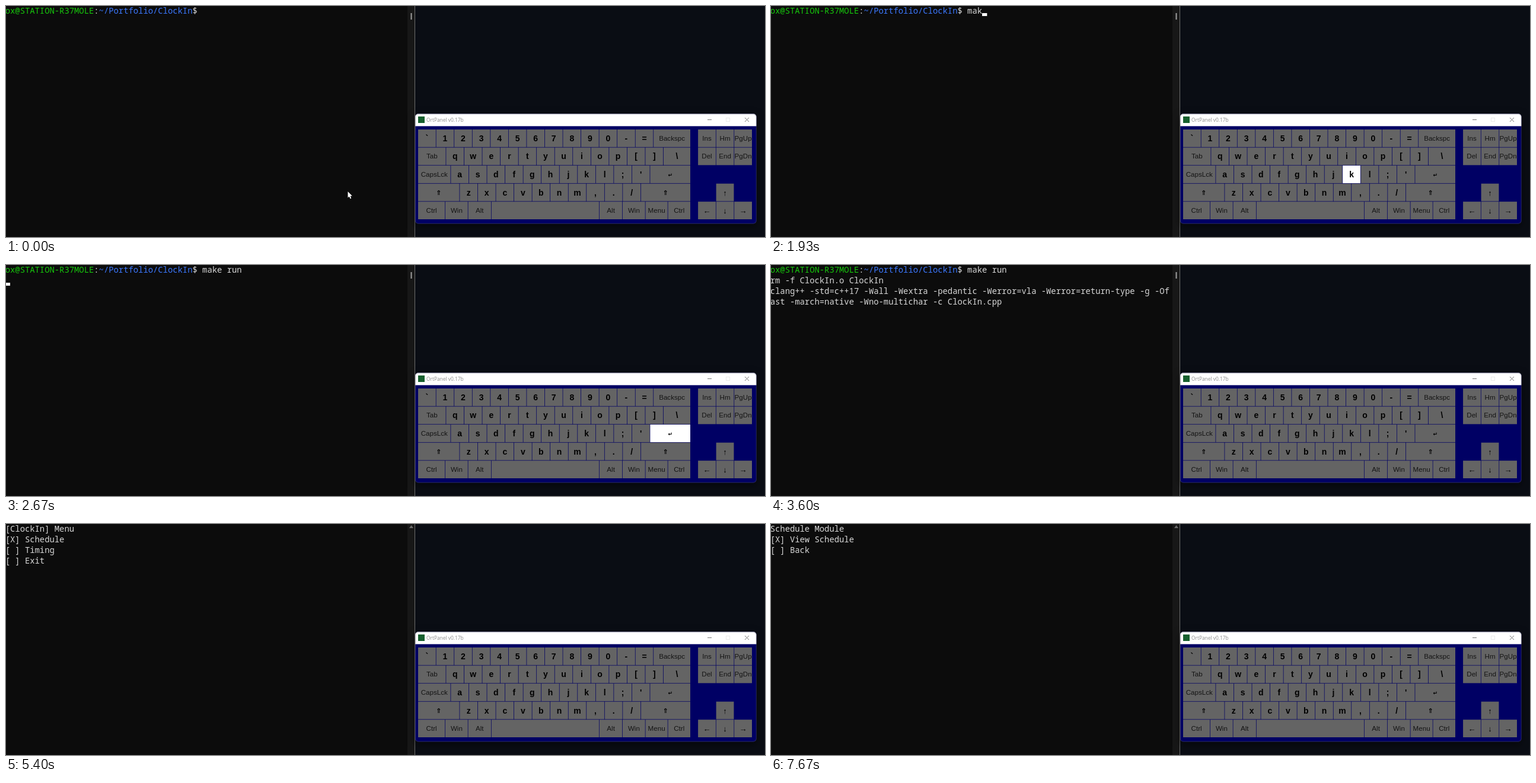
These frames come from a looping animation (1280 by 391 pixels, 8 s). An HTML page with a canvas:

```html
<!DOCTYPE html>
<html lang="en">
<head>
<meta charset="utf-8">
<title>Terminal and keyboard</title>
<style>
  html, body { margin: 0; width: 100%; height: 100%; overflow: hidden; background: #0c0c0c; }
  canvas { display: block; width: 100vw; height: 100vh; }
</style>
</head>
<body>
<canvas id="stage" width="1280" height="391"></canvas>
<script>
const ctx = document.getElementById('stage').getContext('2d');
const LOOP = 8000;

// ---- Terminal ----
const CELL = 8.31, LEFT = -1.3, ROW = 18, BASE = 13;
const GREY = '#d8d8d8';
const PROMPT = [['ox@STATION-R37MOLE', '#16c60c'], [':', GREY], ['~/Portfolio/ClockIn', '#3b78ff'], ['$ ', GREY]];
const FLAGS = ['clang++ -std=c++17 -Wall -Wextra -pedantic -Werror=vla -Werror=return-type -g -Of',
               'ast -march=native -Wno-multichar '];
const COMPILE = ['rm -f ClockIn.o ClockIn', FLAGS[0], FLAGS[1] + '-c ClockIn.cpp'];
const LINK = [FLAGS[0], FLAGS[1] + '-o ClockIn ClockIn.o', './ClockIn'];

const menu = (title, items, chosen) =>
  [title, ...items.map((item, i) => `[${i === chosen ? 'X' : ' '}] ${item}`)];
const mainMenu = chosen => menu('[ClockIn] Menu', ['Schedule', 'Timing', 'Exit'], chosen);

// Each step: start time, command typed, held key
const TYPING = [
  [0, '', ''], [1800, 'm', 'm'], [1870, 'ma', 'a'], [1930, 'mak', 'k'], [2000, 'make', 'e'],
  [2070, 'make ', 'Space'], [2130, 'make ', ''], [2200, 'make r', 'r'], [2270, 'make ru', 'u'],
  [2330, 'make ru', ''], [2470, 'make run', 'n'], [2530, 'make run', '']
];
// Key holds after the command has been typed
const HOLDS = [[2670, 2730, '↵'], [6530, 6670, '↓'], [6870, 7000, '↑'], [7530, 7670, '↵']];

function stateAt(t) {
  const [, typed, key] = TYPING.findLast(step => t >= step[0]);
  const hold = HOLDS.find(([from, to]) => t >= from && t < to);
  const state = { typed, key: hold ? hold[2] : key, lines: [], cursor: null, app: t >= 4400 };

  if (t < 2670) {
    const visible = t >= 1800 || (t >= 930 && t < 1470);
    if (visible) state.cursor = [40 + typed.length, 0];
  } else if (t < 2730) {
    state.cursor = [0, 1];
  } else if (t < 4330) {
    state.lines = COMPILE;
    if (t < 3600 || t >= 4130) state.cursor = [0, 4];
  } else if (t < 4400) {
    state.lines = [...COMPILE, ...LINK];
    state.cursor = [0, 7];
  } else if (t < 5400) {
    state.lines = ['[ClockIn] Loading schedule...'];
  } else if (t < 7600) {
    state.lines = mainMenu(t >= 6530 && t < 6870 ? 1 : 0);
  } else {
    state.lines = menu('Schedule Module', ['View Schedule', 'Back'], 0);
  }
  return state;
}

function rect(x, y, w, h, color) {
  ctx.fillStyle = color;
  ctx.fillRect(x, y, w, h);
}

function write(text, col, row, color = GREY) {
  ctx.fillStyle = color;
  [...text].forEach((ch, i) => ctx.fillText(ch, LEFT + (col + i) * CELL, BASE + row * ROW));
}

function drawTerminal({ typed, lines, cursor, app }) {
  rect(0, 0, 677, 391, '#0c0c0c');
  rect(677, 0, 12, 391, '#171717');
  rect(689, 0, 1, 391, '#6e6e6e');
  ctx.font = '500 13.85px "Noto Sans Mono", monospace';
  ctx.textAlign = 'left';
  if (app) {
    polygon([[680, 7], [683.5, 2], [687, 7]], '#6a6a6a');
  } else {
    rect(682.5, 12, 2, 11, '#9f9f9f');
    let col = 0;
    for (const [text, color] of PROMPT) {
      write(text, col, 0, color);
      col += text.length;
    }
    write(typed, col, 0);
  }
  lines.forEach((line, i) => write(line, 0, app ? i : i + 1));
  if (cursor) rect(LEFT + cursor[0] * CELL, 12 + cursor[1] * ROW, CELL, 5, '#ffffff');
}

// ---- Keyboard window ----
const PITCH = 30.55, GAP = 0.75, TOP = 209, X0 = 695, X1 = 1154.75, NAV = 1167.1;
const keys = [];

function addKey(label, x, right, row) {
  keys.push({ label, x, y: TOP + row * PITCH, w: right - GAP - x, h: PITCH - GAP });
}

function addRow(row, first, start, chars, last) {
  if (first) addKey(first, X0, start, row);
  [...chars].forEach((ch, i) => addKey(ch, start + i * PITCH, start + (i + 1) * PITCH, row));
  addKey(last, start + chars.length * PITCH, X1, row);
}

addRow(0, '', X0, '`1234567890-=', 'Backspc');
addRow(1, 'Tab', 742.3, 'qwertyuiop[]', '\\');
addRow(2, 'CapsLck', 750.3, "asdfghjkl;'", '↵');
addRow(3, '⇑', 765.3, 'zxcvbnm,./', '⇑');
const BOTTOM = [X0, 741, 779.5, 818.7, 1001, 1040, 1078.5, 1116.5, X1];
['Ctrl', 'Win', 'Alt', 'Space', 'Alt', 'Win', 'Menu', 'Ctrl']
  .forEach((label, i) => addKey(label, BOTTOM[i], BOTTOM[i + 1], 4));
const addNav = (label, col, row) => addKey(label, NAV + col * PITCH, NAV + (col + 1) * PITCH, row);
['Ins', 'Hm', 'PgUp'].forEach((label, i) => addNav(label, i, 0));
['Del', 'End', 'PgDn'].forEach((label, i) => addNav(label, i, 1));
addNav('↑', 1, 3);
['←', '↓', '→'].forEach((label, i) => addNav(label, i, 4));

function labelStyle(label) {
  if ('←↑→↓'.includes(label)) return ['13px "Liberation Sans", sans-serif', 5];
  if (label === '⇑') return ['bold 11px "DejaVu Sans", sans-serif', 4];
  if (label === '↵') return ['bold 9px "DejaVu Sans", sans-serif', 4];
  if (label.length === 1) return ['bold 14px "Liberation Sans", sans-serif', 5];
  return ['11.6px "Liberation Sans", sans-serif', 4];
}

function drawKey({ label, x, y, w, h }, held) {
  rect(x, y, w, h, held ? '#ffffff' : '#646464');
  if (label === 'Space') return;
  const [font, drop] = labelStyle(label);
  ctx.font = font;
  ctx.fillStyle = label.length > 1 ? '#141414' : '#000000';
  ctx.fillText(label, x + w / 2, Math.round(y + h / 2 + drop));
}

function drawWindow() {
  const outline = new Path2D();
  outline.roundRect(690, 182.5, 575.5, 186, 5);
  ctx.save();
  ctx.shadowColor = 'rgba(0, 0, 0, 0.5)';
  ctx.shadowBlur = 14;
  ctx.shadowOffsetY = 4;
  ctx.fillStyle = '#000064';
  ctx.fill(outline);
  ctx.restore();

  ctx.save();
  ctx.clip(outline);
  rect(690, 182, 576, 21.4, '#ffffff');
  ctx.lineWidth = 1.4;
  ctx.strokeStyle = 'rgba(90, 90, 110, 0.6)';
  ctx.stroke(outline);
  ctx.restore();
}

function drawTitleBar() {
  rect(695, 187, 11, 11, '#17602f');
  ctx.font = '8.4px "Open Sans", sans-serif';
  ctx.textAlign = 'left';
  ctx.fillStyle = '#8c8c8c';
  ctx.fillText('OrtPanel v0.17b', 709, 196);

  rect(1183, 192, 7, 1, '#777777');
  ctx.lineWidth = 1;
  ctx.strokeStyle = '#eaeaea';
  ctx.strokeRect(1214.5, 189.5, 6, 6);
  ctx.strokeStyle = '#777777';
  ctx.beginPath();
  ctx.moveTo(1246, 189);
  ctx.lineTo(1253, 196);
  ctx.moveTo(1253, 189);
  ctx.lineTo(1246, 196);
  ctx.stroke();
}

function drawKeyboard(held) {
  rect(690, 0, 590, 391, '#0a0d14');
  drawWindow();
  drawTitleBar();
  ctx.textAlign = 'center';
  for (const key of keys) drawKey(key, key.label === held);
}

// ---- Pointer ----
function polygon(points, fill, stroke) {
  ctx.beginPath();
  points.forEach(([x, y]) => ctx.lineTo(x, y));
  ctx.closePath();
  if (stroke) {
    ctx.lineWidth = 1;
    ctx.strokeStyle = stroke;
    ctx.stroke();
  }
  ctx.fillStyle = fill;
  ctx.fill();
}

const ARROW = [[0, 0], [0, 10.5], [2.4, 8.4], [4, 12.2], [5.8, 11.4], [4.2, 7.8], [7.4, 7.6]];

function drawPointer(t) {
  if (t >= 1800) return; // hidden while typing
  const step = t < 70 ? 0 : Math.min(8, 1 + Math.floor((t - 70) / 65.7));
  const p = step / 8, ease = p * p * (3 - 2 * p);
  const x = 576.5 - 190 * ease;
  const y = 314 + 20 * ease + 30 * Math.sin(Math.PI * ease);
  polygon(ARROW.map(([dx, dy]) => [x + dx, y + dy]), '#ffffff', '#000000');
}

function draw(now) {
  const t = now % LOOP;
  const state = stateAt(t);
  drawTerminal(state);
  drawKeyboard(state.key);
  drawPointer(t);
}

function loop() {
  draw(performance.now());
  requestAnimationFrame(loop);
}
loop();
</script>
</body>
</html>
```
